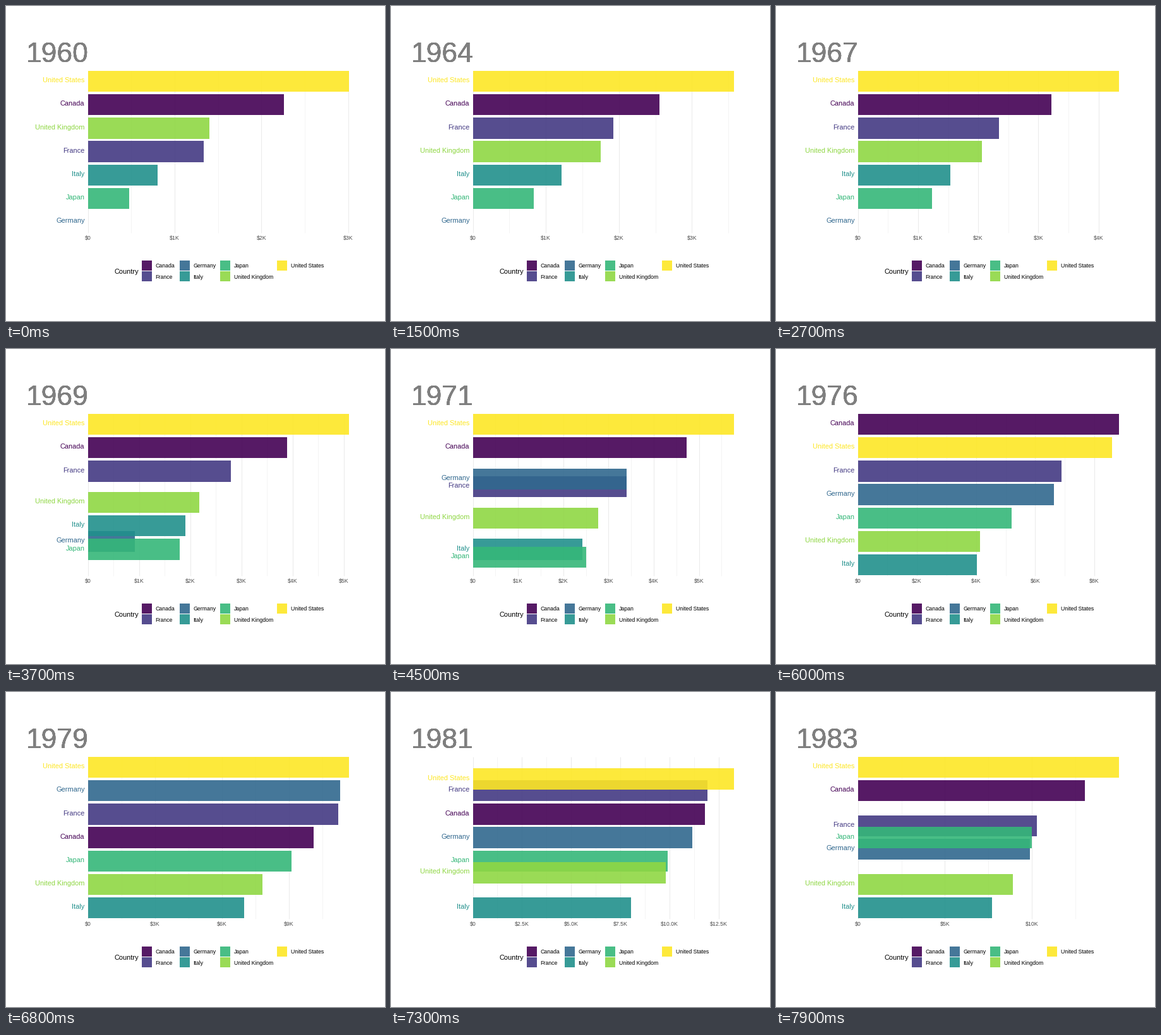
Animation, 600 px wide and 500 px high, one loop 8 s. Source, as a matplotlib script:

```python
import matplotlib.pyplot as plt
import numpy as np
from matplotlib.animation import FuncAnimation
from matplotlib.collections import LineCollection
from matplotlib.patches import Rectangle

plt.rcParams["font.family"] = "Liberation Sans"

W, H, DPI = 600, 500, 72
LEFT, RIGHT = 129.6, 542.7
TOP, BOTTOM = 102.8, 359.6
ROW0, PITCH, BAR_H = 119.5, 37.2, 33.5
FIRST_YEAR, FRAMES = 1960, 80

_ = None  # gap, filled by interpolation
GDP = {
    "Canada": [2259, 2240, 2268, 2374, 2555, 2770, 3047, 3217, 3468, 3770,
               4125, 4535, 5108, 5865, 7068, 7530, 8828, 8955, 9165, 10091,
               11222, 12400, 12550, 13500],
    "France": [1334, 1434, 1585, _, 1928, _, 2205, 2345, 2550, 2765,
               2870, 3176, 3862, 4979, 5354, 6727, 6900, 7520, 9290, 11215,
               12714, 11140, 10530, 10030],
    "Germany": [0] * 10 + [2761, 3192, 3810, 5047, 5639, 6236, 6634, 7682,
                           9482, 11281, 12138, 10209, 9914, 9864],
    "Italy": [804, _, _, 1126, _, _, 1402, _, _, 1813,
              2107, 2306, 2671, 3205, 3621, 4107, 4033, 4603, 5610, 6990,
              8457, 7623, 7557, 7833],
    "Japan": [479, _, 634, 718, 836, 920, 1059, 1229, 1451, 1669,
              2038, 2272, 2967, 3998, 4354, 4674, 5198, 6335, 8822, 9105,
              9465, 10361, 9578, 10440],
    "United Kingdom": [1398, _, _, 1613, 1748, _, 1987, 2059, 1952, 2101,
                       2348, 2650, 3030, 3426, 3666, 4300, 4138, 4681, 5977,
                       7805, 10032, 9599, 9146, 8692],
    "United States": [3007, 3067, 3244, 3375, 3574, 3828, 4146, 4336, 4696,
                      5032, 5234, 5609, 6094, 6726, 7226, 7801, 8592, 9453,
                      10565, 11674, 12575, 13976, 14434, 15544],
}
COLORS = ["#440154", "#443A83", "#31688E", "#21908C",
          "#35B779", "#8FD744", "#FDE725"]
NAMES = list(GDP)
N_YEARS = len(GDP["Canada"])
STEPS = np.arange(N_YEARS)


def fill(row):
    row = np.array(row, dtype=float)
    known = ~np.isnan(row)
    return np.interp(STEPS, STEPS[known], row[known])


VALUES = np.array([fill(r) for r in GDP.values()])
RANKS = np.argsort(np.argsort(-VALUES, axis=0), axis=0)

# Each year settles at `arrive` and starts to change after `leave`.
arrive = np.concatenate([np.arange(-1, 48, 4), [50, 53, 56, 60],
                         np.arange(62, 81, 3)])
leave = arrive + (arrive != 60)
KNOTS = np.column_stack([arrive, leave]).ravel()
KNOT_YEARS = np.repeat(STEPS, 2)


def blend(table, pos):
    return np.array([np.interp(pos, STEPS, row) for row in table])


def tick_step(top):
    """Extended-Wilkinson choice of step for an axis from 0 to top."""
    best, choice = -9, None
    for i, q in enumerate([1, 5, 2, 2.5, 4, 3]):
        for scale in (100, 1000, 10000):
            step = q * scale
            low = int(top // step)
            for n in (low, low + 1):
                if n < 1:
                    continue
                last = n * step
                cover = 1 - 0.5 * ((top - last) / (0.1 * top)) ** 2
                ratio = max(last, top) / (4 * step)
                density = 2 - max(ratio, 1 / ratio)
                score = 0.25 * (1 - i / 5) + 0.2 * cover + 0.5 * density
                if score > best:
                    best, choice = score, step
    return choice


def money(value, step):
    if value == 0:
        return "$0"
    digits = 1 if step % 1000 else 0
    return f"${value / 1000:.{digits}f}K"


fig = plt.figure(figsize=(W / DPI, H / DPI), dpi=DPI, facecolor="white")
ax = fig.add_axes([0, 0, 1, 1])
ax.set_xlim(0, W)
ax.set_ylim(H, 0)
ax.axis("off")


def write(x, y, s="", size=8.8, color="black", ha="left"):
    return ax.text(x, y, s, size=size, color=color, ha=ha, va="baseline",
                   zorder=20)


def box(x, y, w, h, color, z):
    return ax.add_patch(Rectangle((x, y), w, h, facecolor=color, alpha=0.9,
                                  linewidth=0, snap=True, zorder=z))


grid = ax.add_collection(LineCollection([], colors="#EBEBEB", zorder=1))
ticks = [write(0, 371.5, color="#4D4D4D", ha="center") for _k in range(9)]
bars = [box(LEFT, 0, 0, BAR_H, c, 2 + i) for i, c in enumerate(COLORS)]
labels = [write(124.5, 0, n, 11, c, "right") for n, c in zip(NAMES, COLORS)]
# One copy per country, which hardens the glyph edges.
years = [write(130.4, 89, "", 44.5, "#7F7F7F", "right") for _k in NAMES]

write(171, 425, "Country", 11)
for i, (name, color) in enumerate(zip(NAMES, COLORS)):
    x = (214.7, 274.7, 338.7, 428.7)[i // 2]
    y = 403.8 + 17.28 * (i % 2)
    box(x, y, 16.2, 16.2, color, 2)
    write(x + 22, y + 11.5, name)


def draw(frame):
    pos = np.interp(frame, KNOTS, KNOT_YEARS)
    values, ranks = blend(VALUES, pos), blend(RANKS, pos)
    top = values.max()
    unit = (RIGHT - LEFT) / top

    for bar, label, value, rank in zip(bars, labels, values, ranks):
        y = ROW0 + PITCH * rank
        bar.set_y(y - BAR_H / 2)
        bar.set_width(value * unit)
        label.set_y(y + 1.6)

    step = tick_step(top)
    marks = np.arange(0, top, step / 2)
    xs = LEFT + marks * unit
    grid.set_segments([[(x, TOP), (x, BOTTOM)] for x in xs])
    grid.set_linewidths([0.53 if k % 2 else 1.07 for k in range(len(xs))])
    for k, tick in enumerate(ticks):
        shown = 2 * k < len(xs)
        tick.set_visible(shown)
        if shown:
            tick.set_x(xs[2 * k])
            tick.set_text(money(marks[2 * k], step))

    year = str(FIRST_YEAR + int(pos + 0.5 + 1e-9))
    for text in years:
        text.set_text(year)
    return [grid, *bars, *labels, *ticks, *years]


anim = FuncAnimation(fig, draw, frames=FRAMES, interval=100, repeat=True,
                     repeat_delay=0, blit=False)
plt.show()
```
